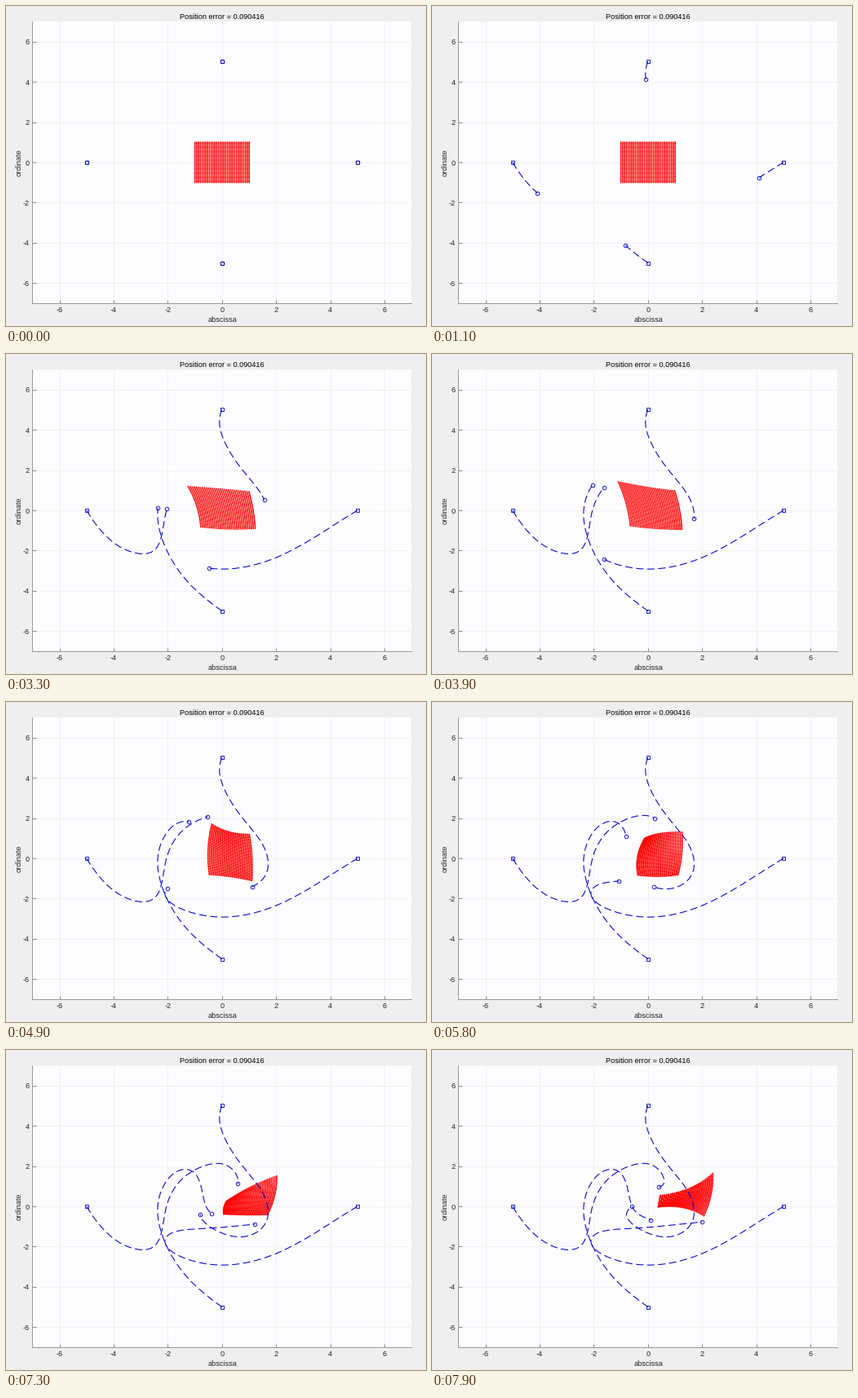
Recreate the animation shown at these times as a matplotlib script. Size 515 by 393 pixels, loop 8000 ms.

```python
import numpy as np
import matplotlib.pyplot as plt
from matplotlib.animation import FuncAnimation

W, H = 515, 393
LEFT, TOP, WIDTH, HEIGHT = 32.4, 19, 465, 346
PX = 0.72  # points per pixel at 100 dpi
FRAMES, INTERVAL = 80, 100
STRIDE = 8  # simulation steps between waypoints
BLUE = "#0808d0"

plt.rcParams["font.family"] = "Liberation Sans"
plt.rcParams["font.size"] = 9.2 * PX

# Waypoints in axes units, one every STRIDE steps
WAYPOINTS = {
    "west": [(-5, 0), (-4.08, -1.52), (-2.54, -2.02), (-2.08, -0.16),
             (-1.39, 1.46), (-0.26, 2.13), (0.42, 1.78), (0.59, 1.17),
             (0.32, 0.91)],
    "east": [(5, 0), (4.11, -0.75), (2.06, -2.31), (-0.2, -2.91),
             (-1.91, -2.19), (-1.85, -1.32), (-0.5, -1.09), (1.04, -0.91),
             (2.3, -0.73)],
    "north": [(0, 5), (-0.08, 4.14), (0.56, 2.35), (1.48, 0.73),
              (1.64, -0.73), (0.86, -1.5), (-0.17, -1.23), (-0.79, -0.49),
              (-0.48, 0.14)],
    "south": [(0, -5), (-0.83, -4.13), (-1.87, -2.43), (-2.38, -0.16),
              (-1.85, 1.56), (-1.05, 1.7), (-0.72, 0.65), (-0.45, -0.28),
              (0.32, -0.77)],
}

# Patch poses: step, corners clockwise from top left, outward bulge per edge
SQUARE = [(-1, 1), (1, 1), (1, -1), (-1, -1)]
POSES = [
    (12, SQUARE, (0, 0, 0, 0)),
    (30, [(-1.1, 1.42), (0.98, 0.97), (1.25, -0.95), (-0.65, -0.77)],
     (-0.04, 0.05, 0.04, -0.07)),
    (38, [(-0.38, 1.7), (1.01, 1.19), (1.1, -1.11), (-0.47, -0.81)],
     (-0.14, 0.05, -0.05, 0.09)),
    (51, [(-0.05, 0.32), (1.6, 1.38), (1.31, -0.49), (-0.23, -0.71)],
     (0.27, 0.08, 0.16, 0.1)),
    (62, [(0.46, 0.55), (2.39, 1.64), (2.06, -0.47), (0.38, -0.04)],
     (-0.22, 0.1, -0.2, 0)),
]


class Spline:
    """Cubic spline that starts at rest and ends without curvature."""

    def __init__(self, times, values):
        self.t = np.asarray(times, float)
        self.p = np.asarray(values, float).reshape(len(times), -1)
        n = len(times)
        self.h = np.diff(self.t)[:, None]
        secant = np.diff(self.p, axis=0) / self.h
        A, b = np.eye(n), np.zeros_like(self.p)
        for i in range(1, n - 1):
            h0, h1 = self.h[i - 1, 0], self.h[i, 0]
            A[i, i - 1:i + 2] = 1 / h0, 2 / h0 + 2 / h1, 1 / h1
            b[i] = 3 * (secant[i - 1] / h0 + secant[i] / h1)
        A[-1, -2:] = 1, 2
        b[-1] = 3 * secant[-1]
        self.m = np.linalg.solve(A, b)

    def __call__(self, t):
        t = np.clip(np.atleast_1d(t), self.t[0], self.t[-1])
        i = np.clip(np.searchsorted(self.t, t, "right") - 1, 0, len(self.h) - 1)
        h, p, m = self.h[i], self.p, self.m
        s = (t - self.t[i])[:, None] / h
        ease = s * s * (3 - 2 * s)
        return (p[i] + ease * (p[i + 1] - p[i])
                + h * s * (1 - s) * ((1 - s) * m[i] - s * m[i + 1]))


def outline(corners, bulges):
    """Corners followed by the bulged middle of each edge."""
    a = np.array(corners, float)
    b = np.roll(a, -1, axis=0)
    d = b - a
    normal = np.stack([-d[:, 1], d[:, 0]], axis=1)
    normal /= np.hypot(*d.T)[:, None]
    return np.vstack([a, (a + b) / 2 + normal * np.array(bulges)[:, None]])


def blend_weights(u, v):
    """Eight-node quadratic patch weights."""
    corners = [(1 + u * a) * (1 + v * b) * (u * a + v * b - 1) / 4
               for a, b in SQUARE]
    edges = [(1 - u**2) * (1 + v) / 2, (1 - v**2) * (1 + u) / 2,
             (1 - u**2) * (1 - v) / 2, (1 - v**2) * (1 - u) / 2]
    return np.stack(corners + edges, axis=-1)


def step_at(frame):
    """Four steps, then one held frame, after a short wait."""
    n = max(frame - 2, 0)
    return n - n // 5


paths = [Spline(STRIDE * np.arange(len(w)), w) for w in WAYPOINTS.values()]
patch = Spline([p[0] for p in POSES], [outline(c, k) for _, c, k in POSES])
u, v = (g.ravel() for g in np.meshgrid(np.linspace(-1, 1, 31),
                                       np.linspace(-1, 1, 41)))
weights = blend_weights(u, v)

fig = plt.figure(figsize=(W / 100, H / 100), dpi=100, facecolor="#f0eff0")
ax = fig.add_axes([LEFT / W, 1 - (TOP + HEIGHT) / H, WIDTH / W, HEIGHT / H],
                  facecolor="#fdfcfe")
ticks = range(-6, 7, 2)
names = [str(n) for n in ticks]
ax.set(xlim=(-7, 7), ylim=(-7, 7))
ax.set_xticks(ticks, names)
ax.set_yticks(ticks, names)
ax.set_axisbelow(True)
ax.grid(color="#f0f0f3", linewidth=0.9 * PX)
ax.tick_params(direction="in", length=4.5 * PX, width=0.9 * PX, pad=4 * PX,
               color="#808080", labelcolor="#262626")
ax.spines[["top", "right"]].set_visible(False)
ax.spines[["left", "bottom"]].set(color="#909090", linewidth=0.9 * PX)


def label(x, y, text, color="#262626", **kw):
    fig.text(x / W, 1 - y / H, text, color=color, ha="center",
             va="center_baseline", **kw)


label(265.3, 12.5, "Position error = 0.090416", "black")
label(265.3, 384.7, "abscissa")
label(15, 192, "ordinate", rotation=90, rotation_mode="anchor")

dots = ax.scatter(u, v, s=(1.7 * PX) ** 2, c=["#ff0000"] * len(u),
                  linewidths=0, zorder=2)
hollow = dict(mfc="none", mec=BLUE, mew=0.9 * PX, zorder=4)
trails, heads = [], []
for path in paths:
    trails += ax.plot([], [], color=BLUE, lw=1.1 * PX, zorder=3,
                      dashes=(8.2, 4.1), dash_capstyle="butt")
    ax.plot(*path.p[0], "s", ms=3.4 * PX, **hollow)
    heads += ax.plot([], [], "o", ms=4.6 * PX, **hollow)


def draw(frame):
    step = step_at(frame)
    dots.set_offsets(weights @ patch(step).reshape(8, 2))
    times = np.linspace(0, step, 4 * step + 1)
    for path, trail, head in zip(paths, trails, heads):
        xy = path(times)
        trail.set_data(*xy.T)
        head.set_data(*xy[-1:].T)
    return [dots, *trails, *heads]


anim = FuncAnimation(fig, draw, frames=FRAMES, interval=INTERVAL,
                     init_func=lambda: draw(0), repeat=True, repeat_delay=0)
plt.show()
```
